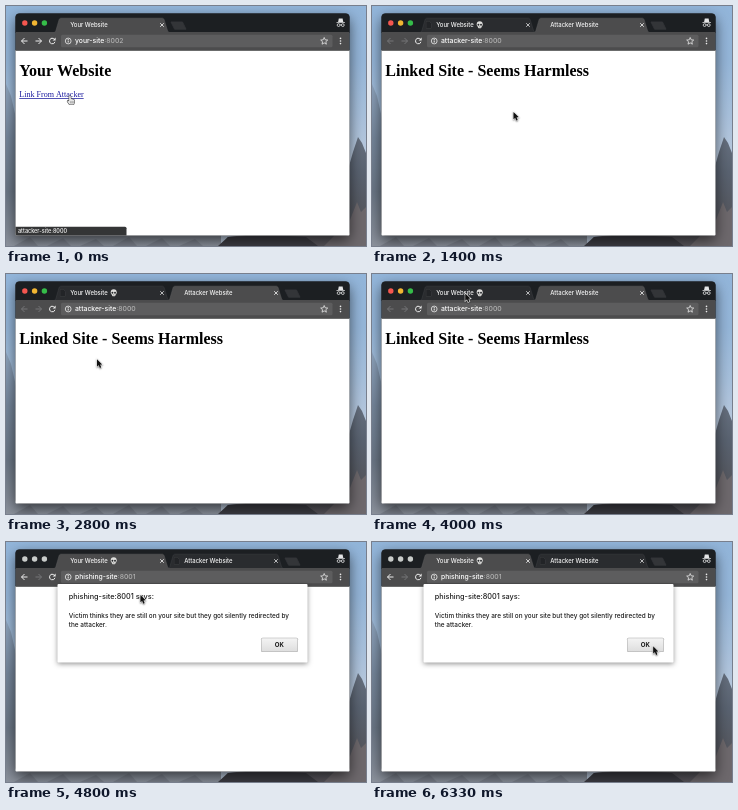
An HTML page with a canvas for the animation above (8 s loop, 360 px wide and 240 px high).

```html
<!DOCTYPE html>
<html lang="en">
<head>
<meta charset="utf-8">
<title>Link to another site</title>
<style>
html, body { margin: 0; width: 100%; height: 100%; overflow: hidden; }
canvas { display: block; width: 100vw; height: 100vh; }
</style>
</head>
<body>
<canvas id="stage"></canvas>
<script>
const W = 360, H = 240, LOOP = 8000;
const OPEN_TAB = 600, SWITCH_TAB = 4330, CLEAR_PAGE = 4530;
const SANS = 'Inter, Roboto, sans-serif';
const SERIF = '"Liberation Serif", "Times New Roman", serif';
const BAR = '#4c4c4d', STRIP = '#1c1f22', LINK = '#1a1a9e';

const canvas = document.getElementById('stage');
const ctx = canvas.getContext('2d');
const ratio = Math.max(1, window.devicePixelRatio || 1);
canvas.width = W * ratio;
canvas.height = H * ratio;

// time, x, y of the pointer's tip
const path = [
  [0, 64, 90], [600, 64, 90], [1300, 141.5, 106], [2000, 141.5, 106],
  [2700, 91, 85.3], [3200, 91, 85.3], [3800, 93.3, 19.5], [4400, 93.3, 19.5],
  [5300, 192, 100], [5400, 192, 100], [6100, 281.2, 104.3]
];

function pointerAt(t) {
  const i = path.findIndex(p => p[0] > t);
  if (i < 0) return path[path.length - 1].slice(1);
  const [t0, x0, y0] = path[i - 1], [t1, x1, y1] = path[i];
  const k = (t - t0) / (t1 - t0), e = k * k * (3 - 2 * k);
  return [x0 + (x1 - x0) * e, y0 + (y1 - y0) * e];
}

function text(str, x, y, size, color, family = SANS, weight = 500) {
  ctx.font = `${weight} ${size}px ${family}`;
  ctx.fillStyle = color;
  ctx.fillText(str, x, y);
  return ctx.measureText(str).width;
}

function rect(x, y, w, h, fill, r = 0) {
  ctx.fillStyle = fill;
  ctx.beginPath();
  ctx.roundRect(x, y, w, h, r);
  ctx.fill();
}

function disc(x, y, r, fill) {
  ctx.fillStyle = fill;
  ctx.beginPath();
  ctx.arc(x, y, r, 0, 7);
  ctx.fill();
}

function poly(points, fill, stroke, width = 1) {
  ctx.beginPath();
  points.forEach(([x, y]) => ctx.lineTo(x, y));
  ctx.closePath();
  if (stroke) {
    ctx.strokeStyle = stroke;
    ctx.lineWidth = width;
    ctx.stroke();
  }
  if (fill) {
    ctx.fillStyle = fill;
    ctx.fill();
  }
}

function line(points, color, width) {
  ctx.beginPath();
  points.forEach(([x, y]) => ctx.lineTo(x, y));
  ctx.strokeStyle = color;
  ctx.lineWidth = width;
  ctx.stroke();
}

function fade(y0, y1, ...colors) {
  const g = ctx.createLinearGradient(0, y0, 0, y1);
  colors.forEach((c, i) => g.addColorStop(i / (colors.length - 1), c));
  return g;
}

function shadowed(blur, dy, color, draw) {
  ctx.save();
  ctx.shadowBlur = blur * ratio;
  ctx.shadowOffsetY = dy * ratio;
  ctx.shadowColor = color;
  draw();
  ctx.restore();
}

function desktop() {
  rect(0, 0, W, H, fade(0, 160, '#92b5da', '#94b5d8', '#a6bfdb', '#bccbde'));
  // hazy slope on the left, darker peak on the right
  poly([[0, 78], [5, 90], [10, 112], [215, 226], [215, 240], [0, 240]],
    fade(78, 240, '#8fa5bf', '#76879c', '#6c7887', '#8b919c'));
  poly([[215, 240], [222, 231], [300, 222], [343, 160], [347, 146], [352, 131],
    [356, 137], [360, 147], [360, 240]],
    fade(130, 240, '#66707f', '#596270', '#555860', '#57545a'));
  poly([[212, 240], [222, 231], [262, 229], [300, 231], [312, 240]], '#3d3d44');
  poly([[344, 214], [351, 196], [355, 206], [360, 201], [360, 240], [318, 240]], '#6d686c');
  for (let i = 0; i < 6; i++)
    poly([[8 + i * 33, 240], [24 + i * 33, 231 + i % 3], [32 + i * 33, 240]], '#7a808b');
}

function tab(x, title, active, skull) {
  const edge = [[x, 26.5], [x + 1.6, 25.6], [x + 5.2, 13.2], [x + 6.6, 12.2],
    [x + 108.5, 12.2], [x + 110, 13.2], [x + 113.8, 25.6], [x + 115.4, 26.5]];
  poly(edge, active ? BAR : '#2a2c2f');
  line(edge, active ? '#5a5b5c' : '#3d3f42', 0.5);
  if (!active) {
    poly([[x + 6.4, 15.5], [x + 9.4, 15.5], [x + 11, 17.2], [x + 11, 22.3], [x + 6.4, 22.3]],
      '#222427', '#47494b', 0.6);
  }
  const end = x + 16.2 + text(title, x + 16.2, 21.2, 5.93, '#f6f6f6');
  if (skull) drawSkull(end + 6, 18.5);
  const c = x + 108;
  const gray = active ? '#e0e0e0' : '#c9cacb';
  line([[c - 1.8, 17.2], [c + 1.8, 20.8]], gray, 0.9);
  line([[c + 1.8, 17.2], [c - 1.8, 20.8]], gray, 0.9);
}

function drawSkull(x, y) {
  const bone = '#dfdfdd';
  disc(x, y - 0.3, 3, bone);
  rect(x - 1.7, y + 1.4, 3.4, 2.3, bone, 0.8);
  disc(x - 1.3, y + 0.2, 0.95, '#25272a');
  disc(x + 1.3, y + 0.2, 0.95, '#25272a');
  rect(x - 0.3, y + 1.4, 0.6, 0.7, '#444');
  line([[x - 1.2, y + 2.7], [x + 1.2, y + 2.7]], '#777', 0.35);
}

function arrowIcon(x, dir, color) {
  line([[x - 3 * dir, 35], [x + 3 * dir, 35]], color, 1);
  line([[x, 32], [x + 3 * dir, 35], [x, 38]], color, 1);
}

function hatAndGlasses(x, y) {
  const c = '#e4e5e6';
  poly([[x - 2.6, y - 0.5], [x - 1.9, y - 4], [x + 1.9, y - 4], [x + 2.6, y - 0.5]], c);
  rect(x - 4.2, y - 0.6, 8.4, 0.9, c);
  ctx.strokeStyle = c;
  ctx.lineWidth = 0.8;
  for (const side of [-1, 1]) {
    ctx.beginPath();
    ctx.arc(x + side * 2.1, y + 2.6, 1.4, 0, 7);
    ctx.stroke();
  }
  line([[x - 0.7, y + 2.4], [x + 0.7, y + 2.4]], c, 0.7);
}

function toolbar(host, port, canGoBack, canGoForward) {
  const nav = on => on ? '#ececec' : '#747577';
  rect(9.5, 26, 334, 18.5, BAR);
  arrowIcon(18.5, -1, nav(canGoBack));
  arrowIcon(32.5, 1, nav(canGoForward));
  ctx.beginPath();
  ctx.arc(46.3, 35, 2.8, 0.3, 5.5);
  ctx.strokeStyle = '#ececec';
  ctx.lineWidth = 1;
  ctx.stroke();
  poly([[49.6, 31.6], [49.6, 34.6], [46.6, 34.6]], '#ececec');

  rect(55, 28.7, 271.5, 12.6, '#5d5d5e', 1.5);
  ctx.beginPath();
  ctx.arc(62.2, 35, 2.9, 0, 7);
  ctx.strokeStyle = '#ececec';
  ctx.lineWidth = 0.8;
  ctx.stroke();
  rect(61.7, 34.5, 1, 2.1, '#ececec');
  rect(61.7, 33, 1, 0.9, '#ececec');
  const w = text(host, 69, 37.4, 6.82, '#ffffff');
  text(port, 69 + w, 37.4, 6.82, '#b0b0b0');

  const star = [];
  for (let i = 0; i < 10; i++) {
    const a = i * Math.PI / 5 - Math.PI / 2, r = i % 2 ? 1.7 : 3.7;
    star.push([318.2 + r * Math.cos(a), 35.2 + r * Math.sin(a)]);
  }
  poly(star, null, '#e8e8e8', 0.8);
  for (const y of [32.4, 35, 37.6]) disc(334.5, y, 0.8, '#ececec');
}

function homePage() {
  text('Your Website', 13.3, 69.6, 16, '#000', SERIF, 700);
  const w = text('Link From Attacker', 13.3, 91.4, 8.05, LINK, SERIF, 400);
  rect(13.3, 92.2, w, 0.7, LINK);
}

function dialog() {
  shadowed(5, 1.5, 'rgba(0,0,0,.42)', () => rect(51.5, 42, 250, 78.5, '#fff', 1));
  text('phishing-site:8001 says:', 62.8, 57, 7.3, '#1c1c1c');
  text('Victim thinks they are still on your site but they got silently redirected by',
    62.8, 76, 6.42, '#1c1c1c');
  text('the attacker.', 62.8, 84.6, 6.42, '#1c1c1c');
  rect(255, 95.8, 37, 14.2, '#a9a9a9', 1.5);
  rect(255.5, 96.3, 36, 13.2, fade(96, 110, '#f4f4f4', '#dddddd'), 1.2);
  ctx.textAlign = 'center';
  text('OK', 273.4, 105.2, 6.1, '#1c1c1c', SANS, 700);
  ctx.textAlign = 'left';
}

function arrowPointer(x, y) {
  const shape = [[0, 0], [0, 7.3], [1.7, 5.8], [2.9, 8.6], [4.2, 8], [3, 5.3], [5.2, 5.1]]
    .map(([a, b]) => [x + a, y + b]);
  shadowed(1.5, 0.6, 'rgba(0,0,0,.4)', () => poly(shape, '#111', '#fff', 1.2));
}

function handPointer(x, y) {
  const shape = [[-0.8, 0], [0.6, 0], [0.9, 3], [2.4, 3.2], [4.2, 4], [4.4, 6], [3.6, 8.4],
    [-0.5, 8.4], [-2.6, 5.4], [-2.2, 4.6], [-0.9, 5.4]].map(([a, b]) => [x + a, y + b]);
  ctx.lineJoin = 'round';
  poly(shape, '#e6e6e6', '#505050', 1.2);
  for (const dx of [0.7, 2, 3.2]) line([[x + dx, y + 5.2], [x + dx, y + 7.4]], '#666', 0.5);
  ctx.lineJoin = 'miter';
}

function browser(t) {
  const opened = t >= OPEN_TAB, returned = t >= SWITCH_TAB;
  const onLinked = opened && !returned;

  shadowed(14, 5, 'rgba(0,0,0,.6)', () => rect(9.5, 7.6, 334, 222, STRIP, 4));
  ctx.save();
  ctx.beginPath();
  ctx.roundRect(9.5, 7.6, 334, 222, [4, 4, 1, 1]);
  ctx.clip();
  rect(9, 7, 335, 20, STRIP);

  const lights = returned ? ['#c9ccca', '#c9ccca', '#c9ccca'] : ['#f4564f', '#f2b632', '#35bd49'];
  lights.forEach((c, i) => disc(18.8 + i * 9.8, 17, 2.7, c));
  hatAndGlasses(334.7, 16.5);

  if (onLinked) {
    tab(48, 'Your Website', false, true);
    tab(162, 'Attacker Website', true);
  } else {
    if (opened) tab(162, 'Attacker Website', false);
    tab(48, 'Your Website', true, opened);
  }
  if (returned && t < CLEAR_PAGE) {
    ctx.beginPath();
    ctx.arc(58, 19, 2.6, 0.8, 5);
    ctx.strokeStyle = '#47715f';
    ctx.lineWidth = 0.8;
    ctx.stroke();
  }
  const n = opened ? 279 : 165;
  poly([[n, 16], [n + 11.5, 16], [n + 15, 23.2], [n + 3.6, 23.2]], '#333538', '#44474a', 0.5);

  rect(9, 44, 335, 187, '#fff');
  if (onLinked) {
    toolbar('attacker-site', ':8000', false, false);
    text('Linked Site - Seems Harmless', 13.3, 69.6, 16.03, '#000', SERIF, 700);
  } else if (returned) {
    toolbar('phishing-site', ':8001', true, false);
    if (t < CLEAR_PAGE) homePage();
  } else {
    toolbar('your-site', ':8002', true, true);
    homePage();
    rect(9, 220.8, 111.5, 9.4, '#343536', [0, 1.5, 0, 0]);
    text('attacker-site:8000', 12, 227.2, 5.5, '#f6f6f6');
  }
  rect(9, 44, 335, 0.6, '#333435');
  ctx.restore();
  if (returned) dialog();
}

function draw(t) {
  ctx.setTransform(ratio, 0, 0, ratio, 0, 0);
  desktop();
  browser(t);
  const [x, y] = pointerAt(t);
  (t < OPEN_TAB ? handPointer : arrowPointer)(x, y);
}

// The picture advances ten times a second, on a 130/70 ms beat.
function beat(t) {
  const rest = t % 200;
  return t - rest + (rest >= 130 ? 130 : 0);
}

const start = performance.now();
function tick() {
  draw(beat((performance.now() - start) % LOOP));
  requestAnimationFrame(tick);
}
tick();
</script>
</body>
</html>
```
